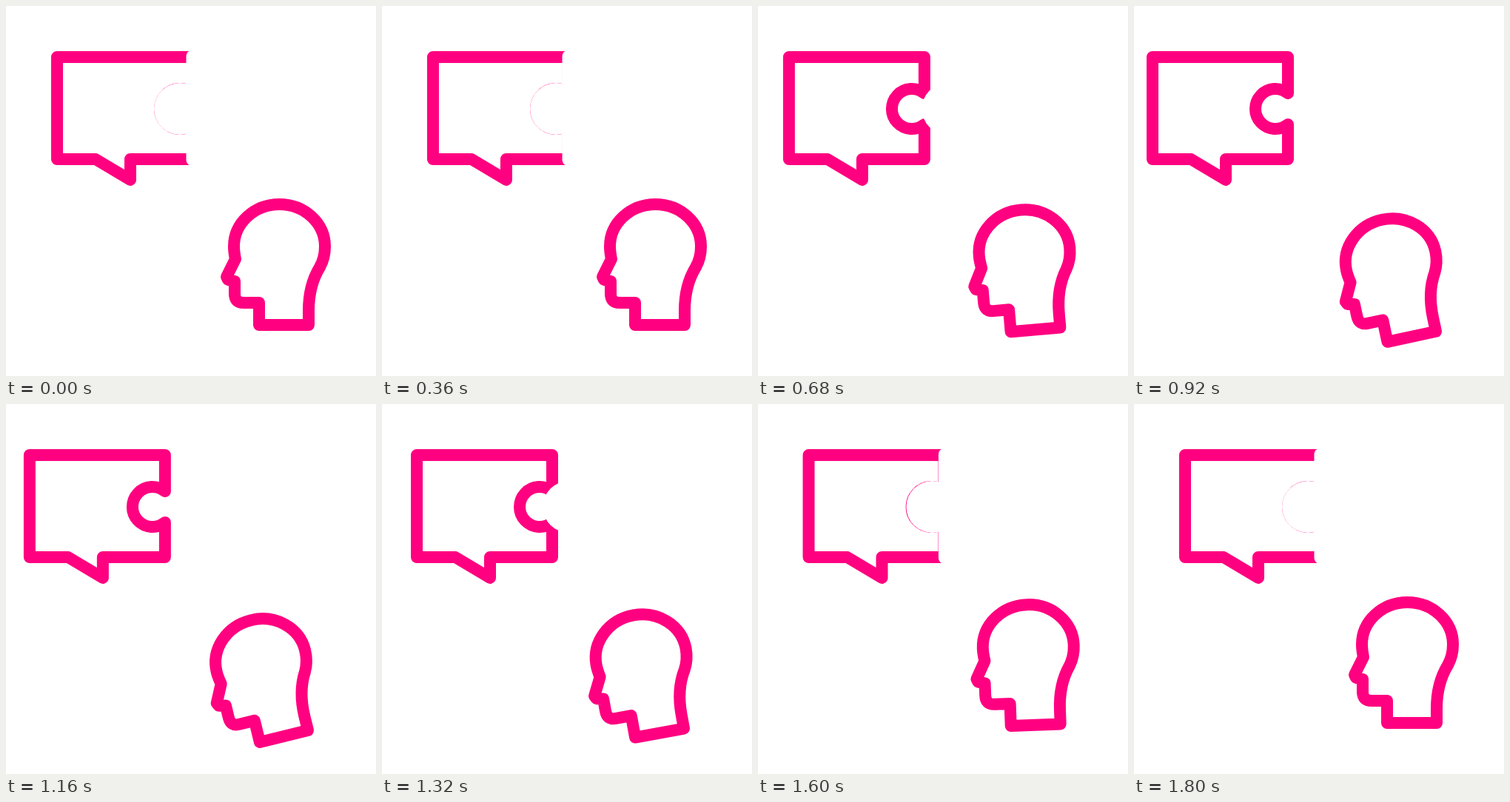
An HTML page that plays this animation: 500x500 px, repeating every 2000 ms.

```html
<!DOCTYPE html>
<html>
<head>
<meta charset="utf-8">
<style>
  html, body { margin: 0; height: 100%; overflow: hidden; background: #fff; }
  svg { display: block; width: 100%; height: 100%; }
  path { fill: none; stroke: #ff0080; stroke-width: 16; stroke-linecap: round; stroke-linejoin: round; }
  #piece { fill: #fff; }
</style>
</head>
<body>
<svg viewBox="0 0 500 500">
  <path id="bubble" d="M252 160A27 27 0 1 1 252 118V69H69V207H121L168 235V207H252Z"
        stroke-dasharray="none"/>
  <g id="piece">
    <rect x="243.5" y="60" width="200" height="156" rx="8"/>
    <circle cx="235" cy="139" r="35"/>
  </g>
  <path id="head" d="M308 325C308 332 309 337 310 342L298 366L300 370L309 372V389Q309 401 321 401H342V431H409V412C409 385 416 366 424 353C429 344 431 335 431 325A61.5 57 0 0 0 308 325Z"/>
</svg>
<script>
  const LOOP = 2000, STEP = 40;
  const [bubble, piece, head] = ['bubble', 'piece', 'head'].map(id => document.getElementById(id));

  const ease = (t, from, to) => {
    const u = Math.min(1, Math.max(0, (t - from) / (to - from)));
    return u * u * (3 - 2 * u);
  };
  // Rises from a to b, falls from c to d
  const swing = (t, a, b, c, d) => ease(t, a, b) - ease(t, c, d);

  function draw(now) {
    const t = Math.floor(now % LOOP / STEP) * STEP;
    const apart = swing(t, 348, 922, 1000, 1640);
    const nod = swing(t, 420, 1080, 1090, 1765);
    bubble.setAttribute('transform', `translate(${-44 * apart} 0)`);
    piece.setAttribute('transform', `translate(${35 * apart} 0)`);
    head.setAttribute('transform', `rotate(${-14.2 * nod} 450 440)`);
    requestAnimationFrame(draw);
  }
  draw(performance.now());
</script>
</body>
</html>
```
